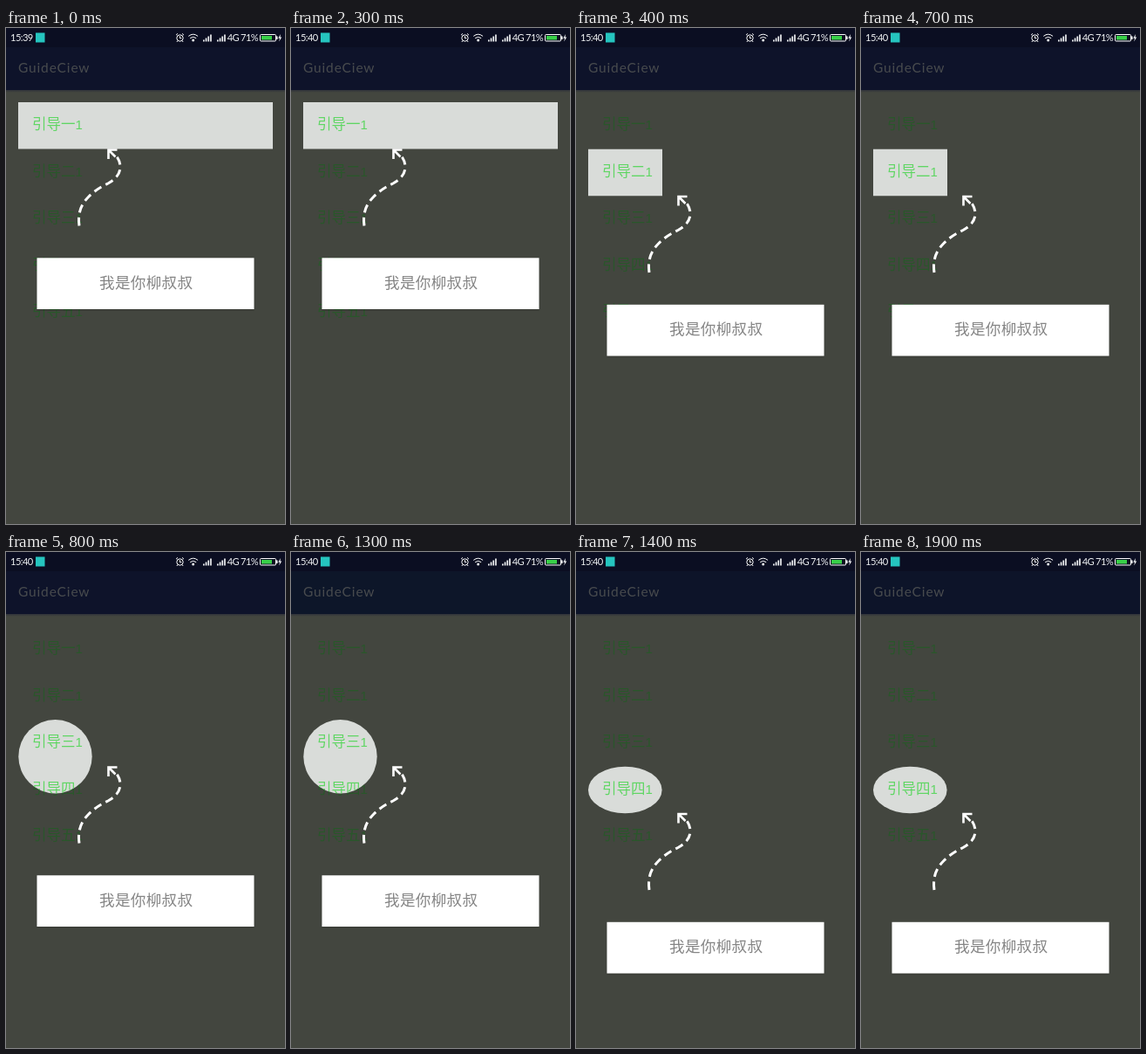
Recreate the animation shown at these times as an HTML page. Size 320 px wide and 568 px high, loop 2 s.

```html
<!DOCTYPE html>
<html lang="zh-CN">
<head>
<meta charset="utf-8">
<title>Guide overlay</title>
<style>
  html, body { margin: 0; width: 100%; height: 100%; overflow: hidden; background: #43463f; }
  svg { display: block; width: 100%; height: 100%; }
  .status { font: 11.2px Lato, sans-serif; letter-spacing: -.6px; fill: #eef0f2; }
  .title { font: 15.5px Lato, sans-serif; letter-spacing: .85px; fill: #484b4e; }
  .row { font: 300 16.5px "Noto Sans CJK SC", sans-serif; }
  .digit { font: 15px "Liberation Sans", sans-serif; }
  .tip { font: 300 17.6px "Noto Sans CJK SC", sans-serif; letter-spacing: .3px; fill: #858585; }
  .dim { fill: #29572a; }
  .lit { fill: #5fd663; }
  .line { fill: none; stroke: #fff; }
</style>
</head>
<body>
<svg viewBox="0 0 320 568">
  <defs>
    <clipPath id="hole"><rect id="cut"/></clipPath>
    <linearGradient id="drop" x2="0" y2="1">
      <stop stop-color="#30333a"/><stop offset="1" stop-color="#43463f"/>
    </linearGradient>
    <filter id="soft" x="-10%" y="-20%" width="120%" height="150%">
      <feDropShadow dx="0" dy="1" stdDeviation="1.2" flood-color="#000" flood-opacity=".2"/>
    </filter>
  </defs>

  <rect width="320" height="568" fill="#43463f"/>
  <rect id="header" width="320" height="71"/>
  <rect width="320" height="22" fill="#0b0e22"/>
  <rect y="71" width="320" height="3" fill="url(#drop)"/>
  <text class="title" x="14" y="50.5">GuideCiew</text>

  <g class="status">
    <text id="clock" x="5" y="15"></text>
    <rect x="34" y="5.5" width="10.5" height="11" fill="#25c4bf"/>
    <g class="line">
      <circle cx="199.5" cy="11.5" r="3.7"/>
      <path d="M199.5 9.3V11.8H201.4M195 8.2L197 6.3M204 8.2L202 6.3M197 14.7L195.8 16M202 14.7L203.2 16"/>
      <path d="M209.3 9.4Q214.7 5 220.1 9.4M211.2 11.7Q214.7 8.9 218.2 11.7"/>
    </g>
    <circle cx="214.7" cy="14" r="1.5"/>
    <g id="bars"></g>
    <text x="253.7" y="15">4G</text>
    <text x="269" y="15">71%</text>
    <rect x="291.5" y="7.5" width="18" height="7.5" rx="1" class="line"/>
    <rect x="310" y="9.5" width="1.6" height="3.5"/>
    <rect x="293" y="9" width="12" height="4.5" fill="#38cf48"/>
    <path d="M314.8 7L312.3 11.8H314L313.2 15.5L316.2 10.5H314.5Z"/>
  </g>

  <g id="dim" class="dim"></g>
  <g clip-path="url(#hole)">
    <rect y="72" width="320" height="496" fill="#d9dcd9"/>
    <g id="lit" class="lit"></g>
  </g>

  <g id="guide">
    <path class="line" stroke-width="3" stroke-dasharray="9.5 5.6"
      d="M84 226.5C82 212 86 202 95 193C102 186 109 182 117 178C126 173 131 167 131 159C131 154 129 150 127 147"/>
    <path class="line" stroke-width="2.6" d="M127.5 139.5H117.5V150M117.5 139.5L125.5 147.5"/>
    <rect x="35.5" y="263.3" width="249" height="58.7" fill="#fff" filter="url(#soft)"/>
    <text class="tip" x="107" y="297.8">我是你柳叔叔</text>
  </g>
</svg>

<script>
const LOOP = 2000, PITCH = 53.5, TOP = 85;
const $ = id => document.getElementById(id);

// Highlight boxes: x, y, width, height, corner radii
const holes = [
  [14, 85, 292, 53.5, 0, 0],
  [14, 138.7, 85, 53.5, 0, 0],
  [14.3, 192, 84.4, 84.4, 42.2, 42.2],
  [14, 245.7, 84.6, 53.5, 42.3, 26.75]
];

// Start time, active guide, clock, header colour
const steps = [
  [0, 0, "15:39", "#0e132a"],
  [200, 0, "15:40", "#0e132a"],
  [400, 1, "15:40", "#0e132a"],
  [800, 2, "15:40", "#0e132a"],
  [1300, 2, "15:40", "#0d1629"],
  [1400, 3, "15:40", "#0d1429"]
];

const rows = [..."一二三四五"].map((n, i) =>
  `<text class="row" x="30" y="${TOP + 31.3 + i * PITCH}">引导${n}<tspan class="digit">1</tspan></text>`
).join("");
$("dim").innerHTML = rows;
$("lit").innerHTML = rows;

$("bars").innerHTML = [226, 242].map(x =>
  [0, 1, 2, 3].map(i => {
    const h = 2 + i * 2;
    return `<rect x="${x + i * 2.7}" y="${15.5 - h}" width="1.7" height="${h}"/>`;
  }).join("")
).join("");

function setHole(box) {
  ["x", "y", "width", "height", "rx", "ry"].forEach((key, i) => $("cut").setAttribute(key, box[i]));
}

let shown;
function draw(now) {
  const t = now % LOOP;
  const step = steps.findLast(s => s[0] <= t) || steps[0];
  if (step !== shown) {
    const [, guide, clock, tone] = shown = step;
    setHole(holes[guide]);
    $("guide").setAttribute("transform", `translate(0 ${guide * PITCH})`);
    $("clock").textContent = clock;
    $("header").setAttribute("fill", tone);
  }
}

const start = performance.now();
function tick() {
  draw(performance.now() - start);
  requestAnimationFrame(tick);
}
tick();
</script>
</body>
</html>
```
